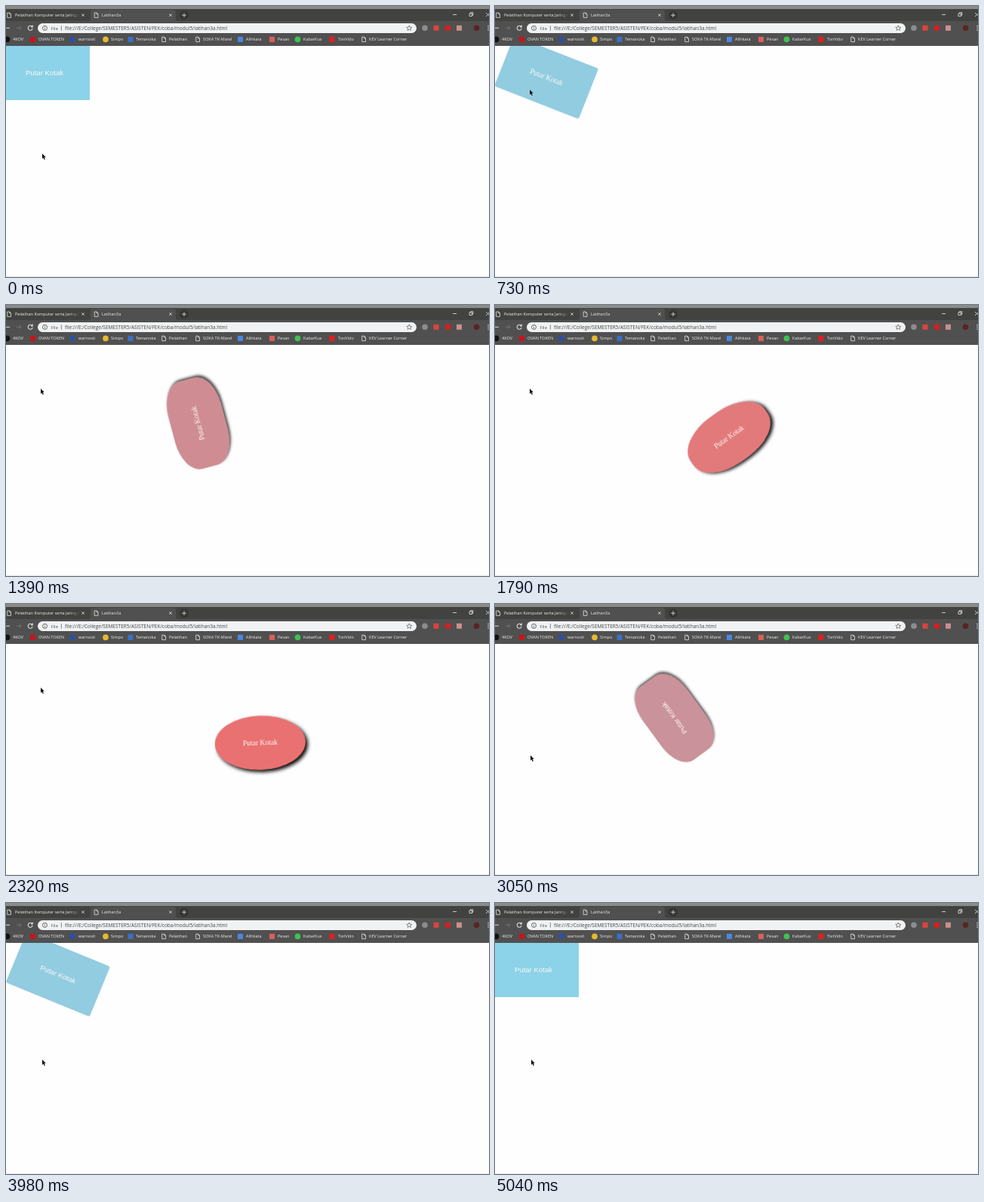
Write an HTML page that moves like this. It is 640 px wide and 360 px high and loops after 5.1 s.

```html
<!DOCTYPE html>
<html lang="id">
<head>
<meta charset="utf-8">
<title>Latihan3a</title>
<style>
html, body { margin: 0; width: 100%; height: 100%; overflow: hidden; background: #fff; }
#stage { position: relative; width: 640px; height: 360px; overflow: hidden; background: #fefefe; }
#page { position: absolute; left: 0; top: 53px; width: 640px; height: 307px; overflow: hidden; }
#box {
  position: absolute; left: -9px; top: 0; width: 120px; height: 72px;
  font: 9.6px/72px "Liberation Sans", Arial, sans-serif;
  text-align: center; color: #fcfaf4; will-change: transform;
}
#box.hover { font-family: "Liberation Serif", "Times New Roman", serif; }
svg { position: absolute; left: 0; top: 0; }
#chrome text { font-family: "Open Sans", "Noto Sans", sans-serif; white-space: pre; }
</style>
</head>
<body>
<div id="stage">
  <div id="page"><div id="box">Putar Kotak</div></div>
  <svg id="chrome" width="640" height="360">
    <defs>
      <linearGradient id="fade" x1="0" x2="1">
        <stop offset="0" stop-color="#424240" stop-opacity="0"/>
        <stop offset="1" stop-color="#424240"/>
      </linearGradient>
    </defs>
    <rect width="640" height="53" fill="#505050"/>
    <rect width="640" height="20" fill="#424240"/>
    <rect width="640" height="4" fill="#8b8b89"/>
    <path d="M109 20Q112 20 112 17V8Q112 5 115 5H222Q225 5 225 8V17Q225 20 228 20Z" fill="#505050"/>
    <rect y="359" width="640" height="1" fill="#e9e9e9"/>
    <rect x="42" y="23" width="502" height="13" rx="6.5" fill="#f1f2f3"/>
    <g id="labels"></g>
    <rect x="84" y="6" width="13" height="13" fill="url(#fade)"/>
    <rect x="97" y="6" width="12" height="13" fill="#424240"/>
    <g fill="none" stroke="#d8d8d8" stroke-width=".9">
      <path d="M100.4 10.4l3.4 3.4m0-3.4l-3.4 3.4M216.3 10.4l3.4 3.4m0-3.4l-3.4 3.4"/>
      <circle cx="236" cy="12.2" r="6" fill="#353533" stroke="none"/>
      <path d="M233.2 12.2h5.6M236 9.4v5.6M592 11.5h5M614 10h3.5v3.5h-3.5zM615.3 10v-1.3h3.5v3.5h-1.3M636 9l5 5m0-5l-5 5"/>
      <path d="M-1 29.3h6M34.6 27.3a3 3 0 1 0 .6 2.6M35.3 25.6v2.3h-2.3" stroke-width="1.1"/>
      <path d="M14 29.3h6m-2.6-2.6l2.6 2.6l-2.6 2.6" stroke="#777"/>
      <circle cx="51.5" cy="29.4" r="3" stroke="#555"/>
      <path d="M51.5 29v2.1M51.5 27.5v.8M73.4 26.3v6.2" stroke="#666" stroke-width=".8"/>
      <path d="M534.3 25.9l1 2.3 2.5.2-1.9 1.6.6 2.4-2.2-1.3-2.2 1.3.6-2.4-1.9-1.6 2.5-.2z" stroke="#555" stroke-width=".7"/>
    </g>
    <g id="icons"></g>
    <g fill="#d8d8d8">
      <circle cx="639" cy="26.6" r=".8"/><circle cx="639" cy="29.3" r=".8"/><circle cx="639" cy="32" r=".8"/>
    </g>
  </svg>
  <svg id="cursor" width="10" height="14" viewBox="-2 -2 10 14">
    <path d="M0 0V6.9L1.5 5.5L2.7 8.2L3.9 7.7L2.8 5.1H4.8Z" fill="#111" stroke="#fff" stroke-width=".5" paint-order="stroke"/>
  </svg>
</div>
<script>
const $ = id => document.getElementById(id);
const box = $('box'), cursor = $('cursor');

function add(parent, tag, attrs, text) {
  const el = document.createElementNS('http://www.w3.org/2000/svg', tag);
  for (const k in attrs) el.setAttribute(k, attrs[k]);
  if (text) el.textContent = text;
  $(parent).append(el);
}
const label = (x, y, text, fill = '#eee', size = 5.5) =>
  add('labels', 'text', { x, y, fill, 'font-size': size }, text);

const icons = {
  dot: (x, y, fill) => add('icons', 'circle', { cx: x, cy: y, r: 3.8, fill }),
  square: (x, y, fill) => add('icons', 'rect', { x: x - 3.5, y: y - 3.5, width: 7, height: 7, fill }),
  page: (x, y) => add('icons', 'path', {
    d: `M${x - 2.3} ${y - 3.2}h3l1.8 1.8v4.6h-4.8zm3 0v1.8h1.8`,
    fill: 'none', stroke: '#e4e4e4', 'stroke-width': .8
  })
};

label(12, 14.2, 'Pelatihan Komputer serta Jaringan');
label(127, 14.2, 'Latihan3a');
label(59.5, 31.6, 'File', '#555', 6);
label(78, 31.6, 'file:///E:/College/SEMESTER5/ASISTEN/FEK/coba/modul5/latihan3a.html', '#444', 6.5);
icons.page(4, 12.2);
icons.page(119.5, 12.2);

// icon x, label x, icon shape, colour, label
[
  [1.5, 9, 'dot', '#111', '4KOV'],
  [35.5, 43, 'square', '#c4161c', 'OVAN TOKEN'],
  [88, 96, 'dot', '#2f4f9f', 'warnosit'],
  [132, 139, 'dot', '#e8b92e', 'Simpo'],
  [165, 172, 'square', '#3b70c4', 'Temanoka'],
  [209, 216, 'page', '', 'Pelatihan'],
  [254, 261, 'page', '', 'SOKA TK-Marel'],
  [310.5, 318, 'square', '#4b87e0', 'Alihkata'],
  [352.5, 360, 'square', '#d9605a', 'Pesan'],
  [386.5, 394, 'dot', '#3fc351', 'KabarKux'],
  [432, 440, 'square', '#e02020', 'TonVido'],
  [474, 481, 'page', '', 'KEV Learner Corner']
].forEach(([ix, tx, shape, fill, text]) => {
  icons[shape](ix, 44.4, fill);
  label(tx, 46.4, text);
});
icons.dot(555, 29.3, '#8a8d90');
icons.square(570, 29.3, '#d8453e');
icons.dot(585.5, 29.3, '#d81e1e');
icons.square(600.5, 29.3, '#c98f8c');
icons.dot(623.5, 29.3, '#5a2326');

const LOOP = 5100, STEP = LOOP / 77;
const ENTER = 585, ENTER_TIME = 1925, LEAVE = 2604, LEAVE_TIME = 1975;
const clamp = v => Math.min(1, Math.max(0, v));
const mix = (a, b, p) => a + (b - a) * p;

// CSS "ease": cubic-bezier(.25, .1, .25, 1)
function ease(x) {
  if (x <= 0 || x >= 1) return clamp(x);
  let lo = 0, hi = 1, s = .5;
  for (let i = 0; i < 24; i++) {
    s = (lo + hi) / 2;
    if (.75 * s * (1 - s) + s ** 3 < x) lo = s; else hi = s;
  }
  return .3 * s * (1 - s) ** 2 + 3 * s * s * (1 - s) + s ** 3;
}

// time, x, y of the pointer tip
const track = [
  [0, 48, 196], [330, 48, 196], [610, 46, 111], [2570, 46, 111],
  [2830, 47, 201], [3140, 47, 201], [3300, 48, 208], [LOOP, 48, 208]
];
function pointer(t) {
  const i = track.findIndex(k => k[0] > t);
  const [t0, x0, y0] = track[i - 1], [t1, x1, y1] = track[i];
  const p = (t - t0) / (t1 - t0), s = p * p * (3 - 2 * p);
  return [mix(x0, x1, s), mix(y0, y1, s)];
}

function place(el, x, y, turn = 0) {
  const c = Math.cos(turn * 2 * Math.PI), s = Math.sin(turn * 2 * Math.PI);
  el.style.transform = `matrix(${[c, s, -s, c, x, y].map(v => v.toFixed(5))})`;
}

const cold = [140, 210, 232], warm = [235, 112, 112];

function draw(now) {
  const t = Math.floor((now % LOOP + 6) / STEP) % 77 * STEP;
  const hover = t >= ENTER && t < LEAVE;
  const p = t < LEAVE ? ease((t - ENTER) / ENTER_TIME) : 1 - ease((t - LEAVE) / LEAVE_TIME);
  box.className = hover ? 'hover' : '';
  place(box, 287.5 * p, 96 * p, p);
  box.style.borderRadius = 50 * p + '%';
  box.style.backgroundColor = `rgb(${cold.map((c, i) => Math.round(mix(c, warm[i], p)))})`;
  box.style.boxShadow = `${3 * p}px ${3 * p}px ${5 * p}px rgba(0, 0, 0, ${p})`;
  const [x, y] = pointer(t);
  place(cursor, x - 2, y - 2);
}

const start = performance.now();
function tick() {
  draw(performance.now() - start);
  requestAnimationFrame(tick);
}
tick();
</script>
</body>
</html>
```
